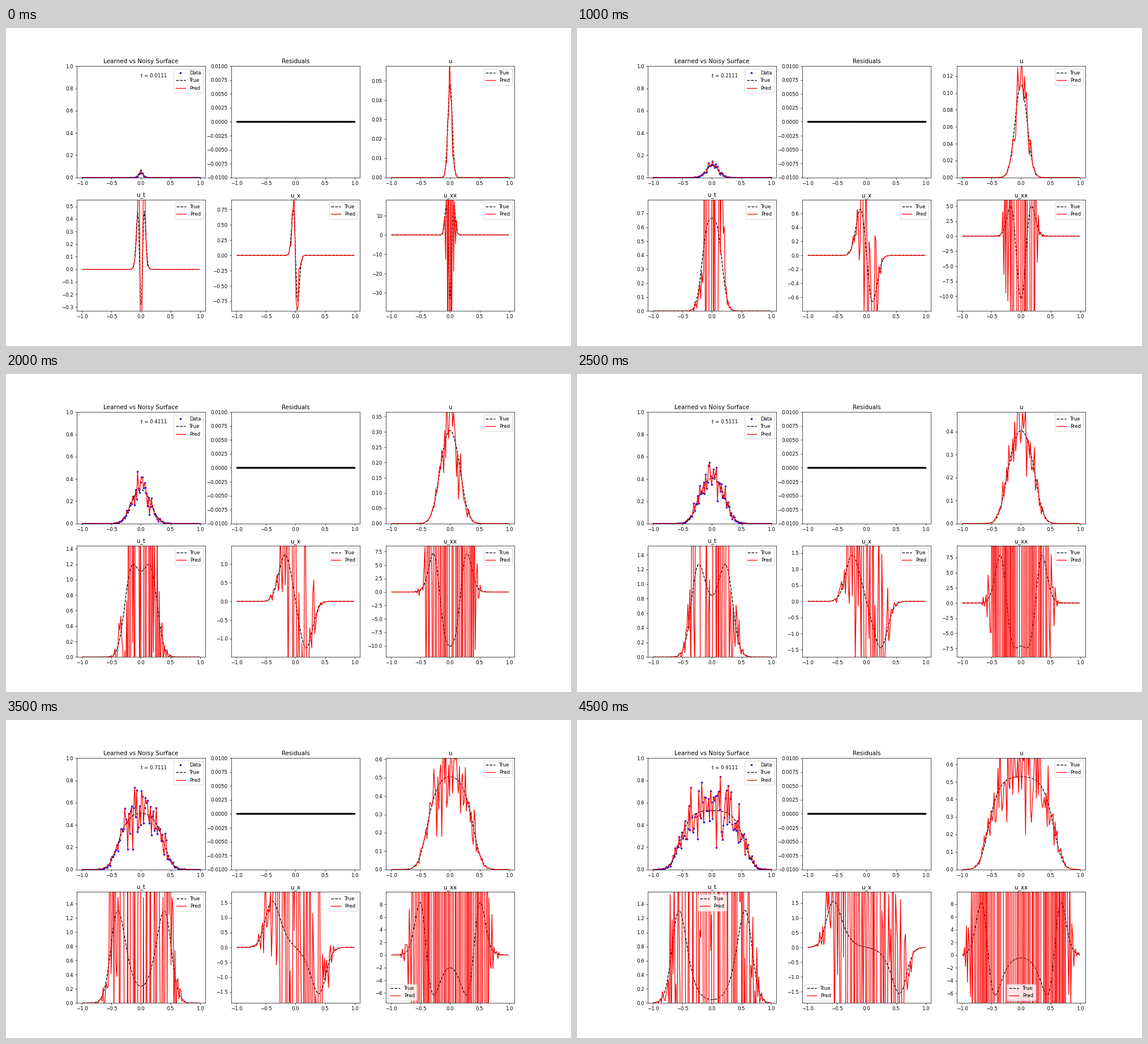
A matplotlib script for the animation above (5000 ms loop, 998 px wide and 561 px high).

```python
import numpy as np
import matplotlib.pyplot as plt
from matplotlib.animation import FuncAnimation

W, H = 998, 561
DPI = W / 16
FRAMES, INTERVAL = 10, 500

# Fisher-KPP: u_t = D u_xx + R u (1 - u / K)
D, R, K = 0.02, 10.0, 1 / 1.87
DT, SUBSTEPS = 1 / 90, 100
NOISE = 0.25

# Solve on a fine grid, sample at the centres of 120 cells
fine = np.linspace(-1, 1, 241)
cells = slice(1, None, 2)
x = fine[cells]
DX = x[1] - x[0]


def solve(steps):
    u = 0.102 * K * np.exp(-fine**2 / (2 * 0.0296**2))
    out = [u[cells]]
    h, dx = DT / SUBSTEPS, fine[1] - fine[0]
    for _ in range(steps):
        for _ in range(SUBSTEPS):
            p = np.pad(u, 1, mode="reflect")
            u_xx = (p[2:] - 2 * u + p[:-2]) / dx**2
            u = u + h * (D * u_xx + R * u * (1 - u / K))
        out.append(u[cells])
    return np.array(out)


surface = solve(84)


def derivatives(before, now, after):
    """u, u_t, u_x and u_xx by finite differences."""
    u_xx = np.zeros_like(now)
    u_xx[1:-1] = np.diff(now, 2) / DX**2
    return now, (after - before) / (2 * DT), np.gradient(now, DX), u_xx


def fields(k):
    rng = np.random.default_rng(40 + k)
    n = 1 + 9 * k
    true = surface[n - 1:n + 2]
    noise = np.clip(rng.standard_normal(true.shape), -2.5, 2.5)
    return derivatives(*true), derivatives(*true * (1 + NOISE * noise))


def legend_loc(title, k):
    """Legends move away once the waves reach their corner."""
    if title == "u_xx" and k >= 6:
        return {6: "upper left", 7: "lower left"}.get(k, "lower center")
    if k == 9:
        return {"u_t": "upper center", "u_x": "lower left"}.get(
            title, "upper right")
    return "upper right"


fig, axes = plt.subplots(2, 3, figsize=(W / DPI, (H + 1e-6) / DPI), dpi=DPI)
axes = axes.ravel()
titles = ["Learned vs Noisy Surface", "Residuals", "u", "u_t", "u_x", "u_xx"]
for ax, title in zip(axes, titles):
    ax.set_title(title)
    ax.set_xlim(1.1 * x[0], 1.1 * x[-1])


def add_pair(ax):
    true, = ax.plot(x, 0 * x, "k--", label="True")
    pred, = ax.plot(x, 0 * x, "r-", label="Pred")
    return true, pred


dots, = axes[0].plot(x, 0 * x, "b.", label="Data")
main_pair = add_pair(axes[0])
axes[0].set_ylim(0, 1)
axes[0].legend(loc="upper right")
clock = axes[0].text(0, 0.9, "")

axes[1].plot(x, 0 * x, "k.")
axes[1].set_ylim(-0.01, 0.01)

pairs = [add_pair(ax) for ax in axes[2:]]
legends = [ax.legend(loc="upper right") for ax in axes[2:]]


def update(k):
    true, pred = fields(k)
    clock.set_text(f"t = {DT + 0.1 * k:.4f}")
    dots.set_ydata(pred[0])
    main_pair[0].set_ydata(true[0])
    main_pair[1].set_ydata(pred[0])
    panels = zip(axes[2:], titles[2:], pairs, legends, true, pred)
    for ax, title, lines, legend, exact, fit in panels:
        lines[0].set_ydata(exact)
        lines[1].set_ydata(fit)
        ax.set_ylim(min(0, 1.2 * exact.min()), 1.2 * exact.max())
        legend.set_loc(legend_loc(title, k))
    return []


anim = FuncAnimation(fig, update, frames=FRAMES, interval=INTERVAL,
                     repeat=True, repeat_delay=0, blit=False)
plt.show()
```
